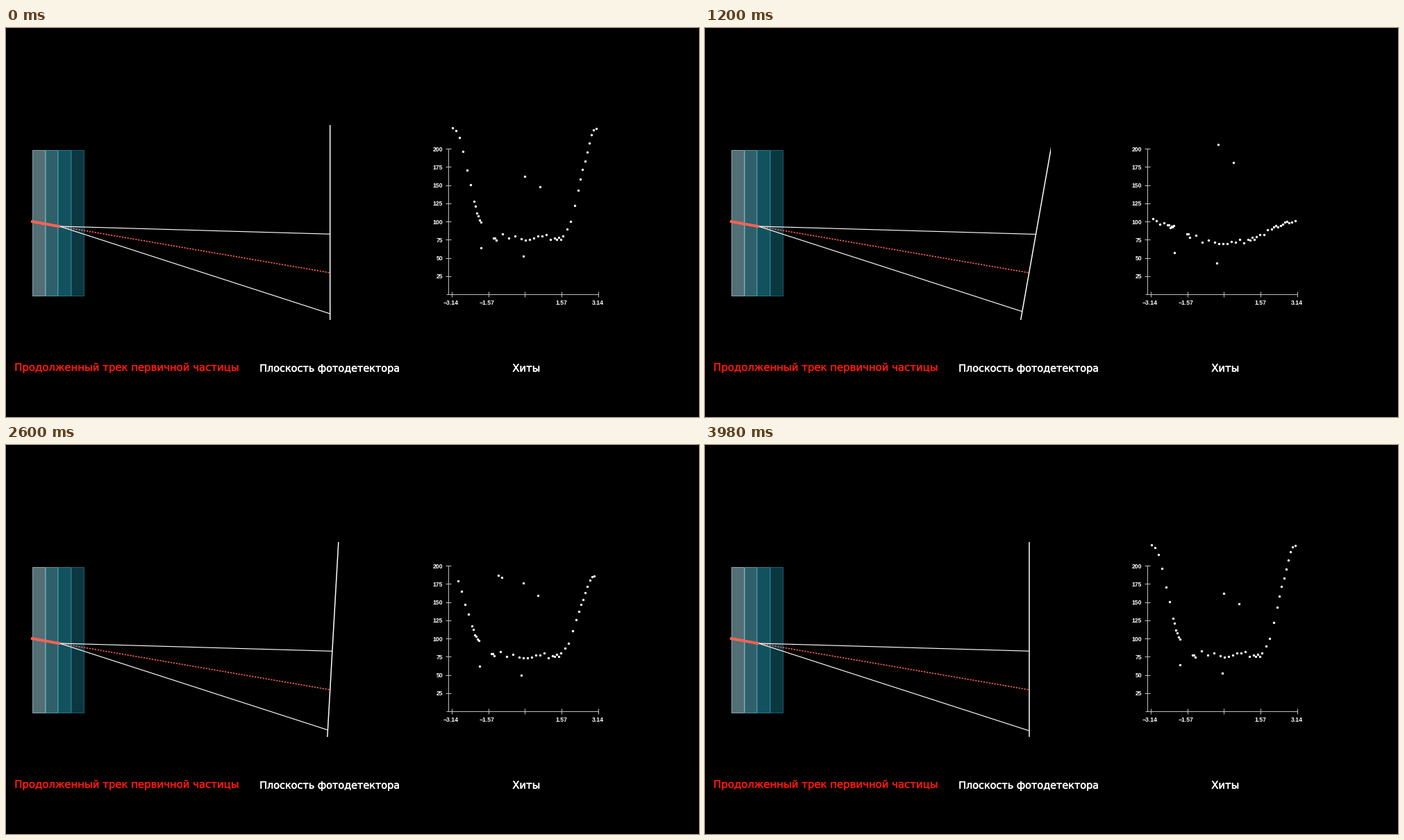
A matplotlib script that plays this animation: 998x561 px, repeating every 4000 ms.

```python
import numpy as np
import matplotlib.pyplot as plt
from matplotlib.animation import FuncAnimation
from matplotlib.patches import Rectangle
from matplotlib.patheffects import withStroke

W, H, DPI = 998, 561, 100
PX = 72 / DPI
FRAMES, STEP = 200, 20
RED = "#fc6255"
AXIS = "#bdbdbd"

fig = plt.figure(figsize=(W / DPI, H / DPI), dpi=DPI, facecolor="black")
ax = fig.add_axes([0, 0, 1, 1])
ax.set_xlim(0, W)
ax.set_ylim(H, 0)
ax.axis("off")


def line(xs, ys, width, color="white", **kw):
    kw.setdefault("solid_capstyle", "butt")
    return ax.plot(xs, ys, color=color, lw=width * PX, **kw)[0]


def label(x, y, text, size, color="white", **kw):
    return ax.text(x, y, text, fontsize=size * PX, color=color, **kw)


def caption(x, y, text, size, color="white"):
    # a thin outline gives a medium weight
    label(x, y, text, size, color,
          path_effects=[withStroke(linewidth=0.45 * PX, foreground=color)])


def clip_box(x0, y0, x1, y1):
    return Rectangle((x0, y0), x1 - x0, y1 - y0, transform=ax.transData)


# Radiator layers
layers = [("#526f75", "#7fa5aa"), ("#2f606a", "#4b929e"),
          ("#12525d", "#277688"), ("#0a3740", "#1b5c6c")]
for i, (fill, edge) in enumerate(layers):
    ax.add_patch(Rectangle((38 + 18.7 * i, 176), 17.6, 210,
                           fc=fill, ec=edge, lw=PX))

# Primary track, its extension and the photon cone
APEX = np.array([77.0, 286.0])
PIVOT = np.array([466.7, 353.0])
SLOPES = (0.0288, 0.3235)
line([APEX[0], PIVOT[0]], [APEX[1], PIVOT[1]], 1.65, RED,
     ls=(0, (1.35, 1.05)), dash_capstyle="butt")
rays = [line([], [], 1.15) for _ in SLOPES]
line([36, 78], [278.8, 286.4], 4, RED, zorder=3)
plane = line([], [], 1.5)
plane.set_clip_path(clip_box(0, 140, 498, 420.5))

# Plot axes
X0, Y0 = 747.4, 384
DX, DY = 33.5, 1.05
line([634, 853], [Y0, Y0], 1, AXIS)
line([637, 637], [174, Y0], 1, AXIS)
NUM = dict(family="Liberation Sans", weight="bold", va="center_baseline")
for v in range(25, 201, 25):
    y = Y0 - v * DY
    line([633, 641], [y, y], 1, AXIS)
    label(629.3, y, str(v), 8.7, ha="right", **NUM)
for k in range(-2, 3):
    x = X0 + k * DX * np.pi / 2
    line([x, x], [380, 388], 1, AXIS)
    if k:
        text = f"{k * np.pi / 2:.2f}".replace("-", "\u2212")
        label(x - (1.8 if k < 0 else 0), 395.5, text, 8.7, ha="center", **NUM)

# Captions
caption(12.2, 494.3, "Продолженный трек первичной частицы", 14.9, "#f3190b")
caption(365.2, 495.5, "Плоскость фотодетектора", 14.4)
caption(729.3, 495.5, "Хиты", 14.8)


# Hits: cone radius against angle, for the upright and the tilted plane
def upright(a):
    return 116 - 64 * np.cos(a) + 37 * np.cos(2 * a) - 13 * np.cos(3 * a)


def tilted(a):
    return 84 - 15 * np.cos(a) + 2 * np.cos(2 * a)


def to_px(angle, radius):
    return np.column_stack([X0 + DX * angle, Y0 - DY * radius])


rng = np.random.default_rng(4)
rank = [0, 6, 11, 12, 14, 18, 26, 30, 34, 42]
knots = [-3.12, -2.19, -1.9, -1.35, -1.24, -0.16, 1.27, 1.63, 2.29, 3.05]
phi = np.interp(np.arange(43), rank, knots)
scatter = rng.normal(0, 1.6, phi.size)
phi_end = phi - 0.248
r0 = upright(phi) + scatter
r1 = tilted(phi_end) + scatter

# stray hits off the cone
stray = np.array([-1.88, -0.07, 0.0, 0.65])
s0 = np.array([64, 52, 162, 148])
s1 = np.array([57, 43, 206, 181])

start = np.vstack([to_px(phi, r0), to_px(stray, s0)])
wrapped = np.where(phi_end < -np.pi, phi_end + 2 * np.pi, phi_end)
end = np.vstack([to_px(wrapped, r1), to_px(stray - 0.248, s1)])
dots = ax.plot([], [], "o", color="white", ms=3.4 * PX, mew=0, snap=False)[0]
dots.set_clip_path(clip_box(600, 140, 900, 420))


def ease(t):
    t = min(max(t, 0), 1)
    return t ** 3 * (10 - 15 * t + 6 * t * t)


def tilt(ms):
    return ease((ms + 12) / 1000) - ease((ms - 2005) / 1000)


def update(i):
    s = tilt(i * STEP)
    k = np.tan(np.radians(10 * s))
    ys = np.array([100, 460])
    plane.set_data(PIVOT[0] + k * (PIVOT[1] - ys), ys)
    for ray, m in zip(rays, SLOPES):
        # where the ray meets the tilted plane
        x = (PIVOT[0] + k * (PIVOT[1] - APEX[1] + m * APEX[0])) / (1 + k * m)
        ray.set_data([APEX[0], x], [APEX[1], APEX[1] + m * (x - APEX[0])])
    dots.set_data(*(start + s * (end - start)).T)
    return plane, dots, *rays


anim = FuncAnimation(fig, update, frames=FRAMES, interval=STEP,
                     repeat=True, repeat_delay=0, blit=False)
plt.show()
```
